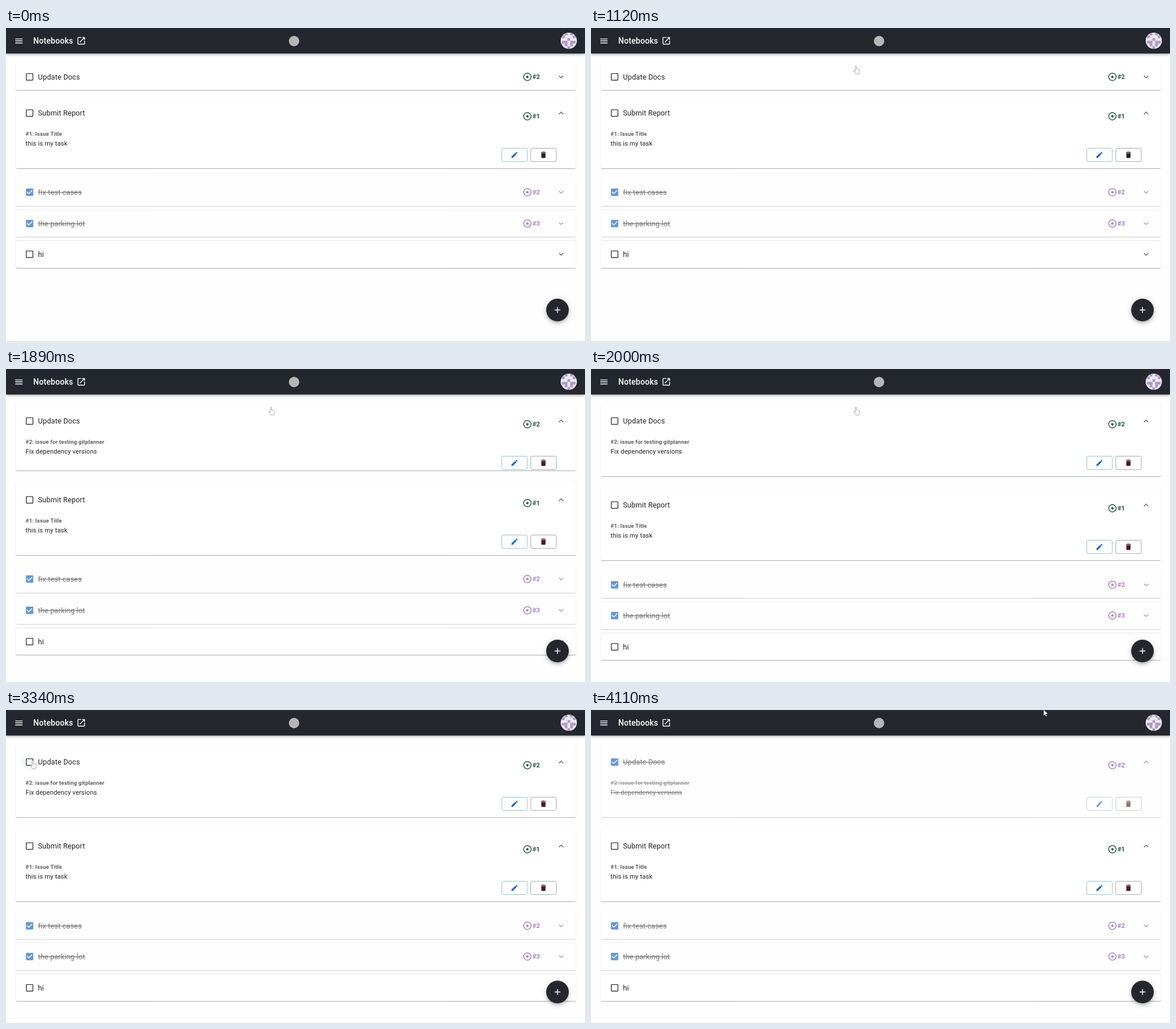
An HTML page that plays this animation: 1000 px wide and 540 px high, repeating every 5130 ms.

```html
<!DOCTYPE html>
<html lang="en">
<head>
<meta charset="utf-8">
<title>Notebooks</title>
<style>
  html, body { margin: 0; width: 100%; height: 100%; overflow: hidden; background: #fefefe; }
  #stage { position: absolute; inset: 0; overflow: hidden; font-family: Roboto, sans-serif; }
  svg { position: absolute; left: 0; top: 0; display: block; }
  text { font-family: Roboto, sans-serif; }
  header {
    position: absolute; left: 0; top: 0; width: 100%; height: 44.4px; background: #24272e;
    box-shadow: 0 1.4px 2.8px -.7px rgba(0,0,0,.2), 0 2.8px 3.5px rgba(0,0,0,.14), 0 .7px 7px rgba(0,0,0,.12);
  }
  .card {
    --lift: 0 1.4px .7px -.7px rgba(0,0,0,.2), 0 .7px .7px rgba(0,0,0,.14), 0 .7px 2px rgba(0,0,0,.12);
    position: absolute; left: 16.5px; width: 967px; overflow: hidden; background: #fff; border-radius: 2px;
    box-shadow: var(--lift);
  }
  .card:nth-child(n+4) { box-shadow: var(--lift), 0 -.7px 0 rgba(0,0,0,.12); }
  .card.done { opacity: .6; }
  .done .task { text-decoration: line-through; }
  .title { font-size: 12.5px; letter-spacing: .117px; fill: #212121; }
  .issue { font-size: 9.7px; font-weight: 700; letter-spacing: .07px; fill: #606060; }
  .note { font-size: 11.1px; letter-spacing: .1px; fill: #212121; }
  .chip { font-size: 11.1px; font-weight: 700; fill: #2f5248; stroke: none; }
  .ring { fill: none; stroke: #2f5a48; stroke-width: 1.5; }
  .done .chip { fill: #74309f; }
  .done .ring { stroke: #74309f; }
  .box { fill: #3c3c3c; }
  .done .box { fill: #0056b2; }
  .chevron { fill: #666; }
  .pencil { fill: #1a69b4; }
  #fab {
    position: absolute; left: 933px; top: 466.5px; width: 39px; height: 39px; border-radius: 50%; background: #24272e;
    box-shadow: 0 2px 3.5px -.7px rgba(0,0,0,.2), 0 4px 7px rgba(0,0,0,.14), 0 .7px 12.5px rgba(0,0,0,.12);
  }
</style>
</head>
<body>
<div id="stage"></div>
<script>
const LOOP = 5130;
const TICKS = [360, 490, 610, 740, 870, 990, 1120, 1760, 1890, 2000, 2120, 2250, 2370, 2490,
  2610, 2730, 2850, 2970, 3090, 3340, 3470, 3610, 3740, 3860, 3990, 4110];
// cursor path: time, x, y
const PATH = [[360, 2, 112], [870, 440, 70], [1120, 453.5, 65], [2250, 453.5, 65], [2490, 180, 98],
  [2850, 58, 91], [3090, 42, 87], [3470, 42, 87], [4110, 781.5, -1]];

const ICONS = {
  menu: 'M3 18h18v-2H3v2zm0-5h18v-2H3v2zm0-7v2h18V6H3z',
  open: 'M19 19H5V5h7V3H5c-1.11 0-2 .9-2 2v14c0 1.1.89 2 2 2h14c1.1 0 2-.9 2-2v-7h-2v7zM14 3v2h3.59l-9.83 9.83 1.41 1.41L19 6.41V10h2V3h-7z',
  empty: 'M19 5v14H5V5h14m0-2H5c-1.1 0-2 .9-2 2v14c0 1.1.9 2 2 2h14c1.1 0 2-.9 2-2V5c0-1.1-.9-2-2-2z',
  ticked: 'M19 3H5c-1.11 0-2 .9-2 2v14c0 1.1.89 2 2 2h14c1.11 0 2-.9 2-2V5c0-1.1-.89-2-2-2zm-9 14l-5-5 1.41-1.41L10 14.17l7.59-7.59L19 8l-9 9z',
  chevron: 'M16.59 8.59L12 13.17 7.41 8.59 6 10l6 6 6-6z',
  pencil: 'M3 17.25V21h3.75L17.81 9.94l-3.75-3.75L3 17.25zM20.71 7.04a1 1 0 0 0 0-1.41l-2.34-2.34a1 1 0 0 0-1.41 0l-1.83 1.83 3.75 3.75 1.83-1.83z',
  bin: 'M6 19c0 1.1.9 2 2 2h8c1.1 0 2-.9 2-2V7H6v12zM19 4h-3.5l-1-1h-5l-1 1H5v2h14V4z',
  plus: 'M19 13h-6v6h-2v-6H5v-2h6V5h2v6h6z'
};
const HAND = 'M3 9.5V1.3a1 1 0 0 1 2 0V6q1-1 1.9.2 1-.7 1.8.4 1.3-.3 1.4 1V11q-.2 2-1.2 3.5H4Q2.5 12 .6 9.6q-.6-1.6.9-1.3z';
const ARROW = 'M0 0V11l2.6-2.4 1.7 4 1.8-.8-1.7-3.9H8z';

const cards = [
  { top: 60.7, title: 'Update Docs', chip: '#2', issue: '#2: issue for testing gitplanner', note: 'Fix dependency versions' },
  { top: 117.7, title: 'Submit Report', chip: '#1', issue: '#1: Issue Title', note: 'this is my task' },
  { top: 260, title: 'fix test cases', chip: '#2' },
  { top: 313.7, title: 'the parking lot', chip: '#3' },
  { top: 367.2, title: 'hi' }
];

const icon = (name, x, y, size, attrs = '', turn = 0) =>
  `<path d="${ICONS[name]}" ${attrs} transform="translate(${x} ${y}) rotate(${turn}) scale(${size / 24}) translate(-12 -12)"/>`;
const label = (cls, x, y, str) => `<text class="${cls}" x="${x}" y="${y}">${str}</text>`;
const button = (x, y, color) =>
  `<rect x="${x}" y="${y}" width="44" height="23" rx="2.5" fill="none" stroke="${color}"/>`;

function details(card, y, binColor) {
  return label('issue task', 33.3, y + 11.1, card.issue) + label('note task', 33.3, y + 27.8, card.note)
    + button(855.8, y + 32.4, '#96c0d2') + icon('pencil', 877.7, y + 43.9, 14, 'class="pencil"')
    + button(905.8, y + 32.4, '#aaa8ab') + icon('bin', 927.7, y + 43.9, 14.4, `fill="${binColor}"`);
}

// head and body: how far the summary and the details have opened, 0 to 1
function cardBody(card, { head, body, done, hover, binColor }) {
  const mid = 23.3 + 5.5 * head, chipY = 23.3 + 11 * head;
  let out = hover ? `<circle cx="40.3" cy="${mid}" r="14" fill="rgba(80,110,215,.05)"/>` : '';
  out += icon(done ? 'ticked' : 'empty', 40.3, mid, 17, 'class="box"');
  out += label('title task', 54.8, mid + 4.4, card.title);
  if (card.chip) {
    out += `<g class="ring"><circle cx="900" cy="${chipY}" r="6.4"/><circle class="chip" cx="900" cy="${chipY}" r="2.1"/></g>`
      + label('chip', 908.7, chipY + 4, card.chip);
  }
  out += icon('chevron', 958.3, mid, 16.7, 'class="chevron"', 180 * head);
  if (body > 0) out += details(card, 46 + 11 * head, binColor);
  return out;
}

function avatar() {
  const rows = [0b01010, 0b10001, 0b00100, 0b11011, 0b01010, 0b00100], cell = 4.7;
  let out = '<clipPath id="disc"><circle cx="972" cy="22" r="14"/></clipPath>'
    + '<circle cx="972" cy="22" r="14" fill="#ece8f1"/><g clip-path="url(#disc)" fill="#ac99c6">';
  rows.forEach((bits, r) => {
    for (let c = 0; c < 5; c++) {
      if (bits >> c & 1) out += `<rect x="${960.25 + c * cell}" y="${8 + r * cell}" width="${cell}" height="${cell}"/>`;
    }
  });
  return out + '</g>';
}

const stage = document.getElementById('stage');
stage.innerHTML = cards.map(() =>
  '<div class="card"><svg width="967" height="130" viewBox="16.5 0 967 130"></svg></div>').join('')
  + `<header><svg width="1000" height="44">
      ${icon('menu', 22.3, 22.3, 16.7, 'fill="#fff"')}
      <text x="47" y="27" font-size="13.9" font-weight="500" letter-spacing=".1" fill="#fff">Notebooks</text>
      ${icon('open', 130, 22, 17, 'fill="#fff"')}
      <circle cx="497.5" cy="22.5" r="9" fill="#b6b6b6"/>
      ${avatar()}
    </svg></header>
    <div id="fab"><svg width="39" height="39">${icon('plus', 19.5, 19.5, 17, 'fill="#fff"')}</svg></div>
    <svg width="1000" height="540"><path id="cursor" stroke-linejoin="round"/></svg>`;
const nodes = [...stage.querySelectorAll('.card')];
const cursor = document.getElementById('cursor');

function cursorAt(t) {
  const i = PATH.findIndex(p => p[0] > t);
  if (i < 0) return PATH[PATH.length - 1].slice(1);
  const [t0, x0, y0] = PATH[i - 1], [t1, x1, y1] = PATH[i];
  const k = (t - t0) / (t1 - t0);
  return [x0 + (x1 - x0) * k, y0 + (y1 - y0) * k];
}

function opening(t) {
  if (t < 1760) return [0, 0];
  if (t < 1890) return [.09, .015];
  return t < 2000 ? [1, .86] : [1, 1];
}

function drawCursor(t) {
  cursor.style.display = t < 360 ? 'none' : '';
  if (t < 360) return;
  const [x, y] = cursorAt(t), hand = y > 60 && x > 12;
  cursor.setAttribute('d', hand ? HAND : ARROW);
  cursor.setAttribute('transform', `translate(${x} ${y})`);
  cursor.setAttribute('fill', hand ? '#fafafa' : '#fff');
  cursor.setAttribute('stroke', hand ? '#999' : '#222');
  cursor.setAttribute('stroke-width', hand ? .8 : .7);
}

function draw(t) {
  const [head, body] = opening(t);
  const shift = 22.2 * head + 66.5 * body;
  const binColor = t < 1760 ? '#222' : t < 1890 ? '#962430' : '#481a20';
  cards.forEach((card, i) => {
    const state = {
      head: i === 0 ? head : +(i === 1),
      body: i === 0 ? body : +(i === 1),
      done: i === 0 ? t >= 3470 : i === 2 || i === 3,
      hover: i === 0 && t >= 2970 && t < 3610,
      binColor
    };
    const node = nodes[i];
    node.classList.toggle('done', state.done);
    node.style.top = card.top + (i ? shift : 0) + 'px';
    node.style.height = 46.5 + 11 * state.head + 66.5 * state.body + 'px';
    node.firstChild.innerHTML = cardBody(card, state);
  });
  drawCursor(t);
}

const start = performance.now();
let shown = -1;
function frame() {
  const t = (performance.now() - start) % LOOP;
  const tick = TICKS.filter(k => k <= t).pop() || 0;
  if (tick !== shown) draw(shown = tick);
  requestAnimationFrame(frame);
}
frame();
</script>
</body>
</html>
```
